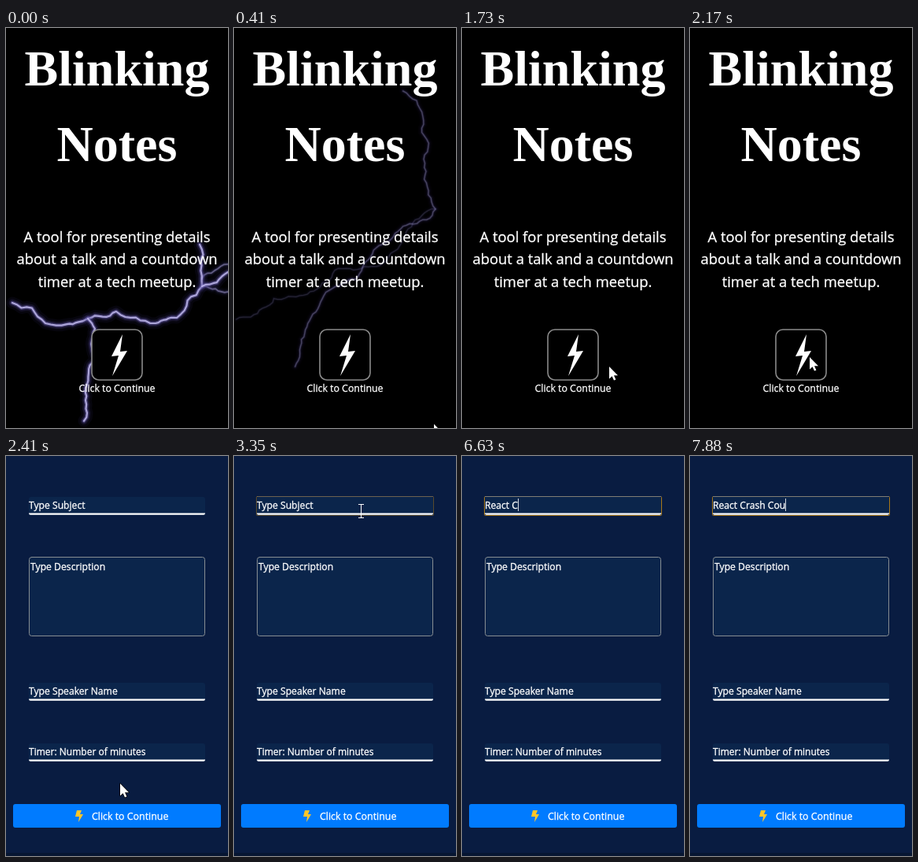
An HTML page with a canvas for the animation above (8 s loop, 282 by 508 pixels).

```html
<!DOCTYPE html>
<html lang="en">
<head>
<meta charset="utf-8">
<title>Blinking Notes</title>
<style>
  html, body { margin: 0; width: 282px; height: 508px; overflow: hidden; background: #000; }
  canvas { display: block; }
</style>
</head>
<body>
<canvas id="stage" width="282" height="508"></canvas>
<script>
const ctx = document.getElementById('stage').getContext('2d');
const LOOP = 8000, FORM_AT = 2340, FOCUS_AT = 3350, TYPE_AT = 5460;
const SANS = '"Open Sans", "Noto Sans", sans-serif';
const SERIF = '"Liberation Serif", "Noto Serif", serif';

let seed = 7;
const random = () => (seed = (seed * 16807) % 2147483647) / 2147483647;
const mix = (a, b, k) => a + (b - a) * k;

// Lightning: a few knots, made jagged by midpoint displacement.
function jag(a, b, out) {
  const dx = b[0] - a[0], dy = b[1] - a[1];
  if (Math.hypot(dx, dy) < 7) return out.push(b);
  const k = (random() - 0.5) * 0.3;
  const mid = [a[0] + dx / 2 - dy * k, a[1] + dy / 2 + dx * k];
  jag(a, mid, out);
  jag(mid, b, out);
}

function branch(text) {
  const knots = text.split(' ').map(p => p.split(',').map(Number));
  const points = [knots[0]];
  for (let i = 1; i < knots.length; i++) jag(knots[i - 1], knots[i], points);
  return new Path2D('M' + points.join('L'));
}

const flash = (start, hold, end, main, faint) =>
  ({ start, hold, end, main: main.map(branch), faint: faint.map(branch) });

function randomFlash(start, hold, end) {
  const spot = y => `${random() * 282},${y}`;
  const fork = spot(230);
  return flash(start, hold, end, [`${spot(80)} ${fork} ${spot(430)}`], [`${fork} ${spot(370)}`]);
}

const flashes = [
  flash(0, 80, 210,
    ['8,349 50,375 104,369 140,360 190,375 217,368 249,328 246,275',
      '249,328 282,310', '104,369 113,382 101,457 99,499'],
    ['249,318 282,300', '250,328 282,335']),
  randomFlash(210, 290, 470),
  randomFlash(610, 920, 920),
  flash(920, 1000, 1300,
    ['60,219 70,241 101,238 106,225 145,204 173,229', '272,349 282,373'],
    ['173,229 178,250 212,270 243,350 232,395', '173,229 188,235 215,207 192,160 166,112',
      '80,204 106,225', '132,209 184,236']),
  randomFlash(1300, 1420, 1660)
];

function strokeBolt(path, strength) {
  const layers = [[15, 0.1, '#3f3880'], [9, 0.2, '#4b4390'], [5, 0.45, '#6d63b4'], [2.2, 0.85, '#c0b9ee']];
  for (const [width, alpha, color] of layers) {
    ctx.lineWidth = width * mix(0.5, 1, strength);
    ctx.globalAlpha = alpha * strength;
    ctx.strokeStyle = color;
    ctx.stroke(path);
  }
  ctx.globalAlpha = 1;
}

function drawLightning(t) {
  ctx.lineJoin = ctx.lineCap = 'round';
  for (const f of flashes) {
    if (t < f.start || t >= f.end) continue;
    const power = t < f.hold ? 1 : (f.end - t) / (f.end - f.hold);
    f.faint.forEach(p => strokeBolt(p, power * 0.5));
    f.main.forEach(p => strokeBolt(p, power));
  }
}

function write(text, x, y, size, align = 'left') {
  ctx.font = `${size}px ${SANS}`;
  ctx.textAlign = align;
  ctx.fillStyle = ctx.strokeStyle = '#fff';
  ctx.lineWidth = 0.3;
  ctx.fillText(text, x, y);
  ctx.strokeText(text, x, y);
}

function writeTitle(text, y) {
  ctx.font = `bold 64px ${SERIF}`;
  ctx.textAlign = 'center';
  ctx.fillStyle = '#fff';
  ctx.fillText(text, 141, y);
}

function rect(x, y, w, h, fill) {
  ctx.fillStyle = fill;
  ctx.fillRect(x, y, w, h);
}

function box(x, y, w, h, radius, fill, border, lineWidth = 1) {
  ctx.beginPath();
  ctx.roundRect(x, y, w, h, radius);
  if (fill) { ctx.fillStyle = fill; ctx.fill(); }
  if (border) { ctx.lineWidth = lineWidth; ctx.strokeStyle = border; ctx.stroke(); }
}

function shape(path, x, y, fill, outline) {
  const p = new Path2D(path);
  ctx.save();
  ctx.translate(x, y);
  if (outline) { ctx.lineWidth = 1.5; ctx.strokeStyle = outline; ctx.stroke(p); }
  ctx.fillStyle = fill;
  ctx.fill(p);
  ctx.restore();
}

function drawIntro(t) {
  rect(0, 0, 282, 508, '#000');
  drawLightning(t);
  writeTitle('Blinking', 73);
  writeTitle('Notes', 169);
  ['A tool for presenting details', 'about a talk and a countdown', 'timer at a tech meetup.']
    .forEach((line, i) => write(line, 141, Math.floor(272 + i * 28.5), 18.4, 'center'));
  box(109, 383, 64, 64, 9, '#000', '#8a8a8a', 1.6);
  shape('M15 0L1 28L10 27L2 53L21 21L12 22Z', 133, 389, '#fff');
  write('Click to Continue', 141, 462, 12.35, 'center');
}

// Each word starts after a pause and is typed at an even pace.
const words = [
  { text: 'React ', start: 5570, pace: 140 },
  { text: 'Crash ', start: 6630, pace: 150 },
  { text: 'Cou', start: 7700, pace: 90 }
];
const typedAt = t => words.map(({ text, start, pace }) =>
  text.slice(0, Math.max(0, Math.floor((t - start) / pace) + 1))).join('');

function lineField(y, text, size = 12.15) {
  box(29, y, 224, 23, 3, '#0b254b');
  box(29, y + 20.5, 224, 2.2, [0, 0, 2, 2], '#fff');
  write(text, 29, y + 15, size);
}

function drawFocus(t, typed) {
  ctx.globalAlpha = t < 3480 ? 0.5 : 1;
  box(28.5, 51.5, 225, 24, 1, null, '#a87718');
  rect(29, 51, 224, 1, '#817d74');
  ctx.globalAlpha = 1;
  const blinkOn = t >= 3480 && Math.floor((t - 3480) / 496) % 2 === 0;
  const caretX = Math.round(29 + ctx.measureText(typed).width);
  if (t >= TYPE_AT || blinkOn) rect(caretX, 54, 1, 16, '#d5dae2');
}

function drawForm(t) {
  rect(0, 0, 282, 508, '#091c41');
  rect(0, 504, 282, 4, '#071632');
  const typed = typedAt(t);
  lineField(52, typed || 'Type Subject');
  if (t >= FOCUS_AT) drawFocus(t, typed);
  box(29.5, 128.5, 223, 100, 3, '#0b254b', '#878d92');
  write('Type Description', 31, 145, 12.2);
  lineField(288, 'Type Speaker Name');
  lineField(365, 'Timer: Number of minutes', 12);
  box(9, 442, 264, 30, 3, '#007bff');
  shape('M2 0L8 0L6 5L10 5L4 15L5 8L0 8Z', 88, 450, '#ffc629');
  write('Click to Continue', 109, 462, 12.4);
}

// Pointer glides: each one starts where the last one ended.
const glides = [
  { from: 300, to: 780, x: 232, y: 468 },
  { from: 920, to: 1660, x: 187, y: 430 },
  { from: 1730, to: 2330, x: 145, y: 416 },
  { from: 2590, to: 3170, x: 161, y: 70 },
  { from: 3990, to: 4220, x: 238, y: 63 }
];

function drawPointer(t) {
  if (t < glides[0].from || t >= glides.at(-1).to) return;
  let x = 258, y = 508;
  for (const g of glides) {
    const k = Math.max(0, Math.min(1, (t - g.from) / (g.to - g.from)));
    const ease = k * k * (3 - 2 * k);
    x = mix(x, g.x, ease);
    y = mix(y, g.y, ease);
  }
  x = Math.round(x);
  y = Math.round(y);
  const overSubject = t >= FORM_AT && y > 52 && y < 75;
  if (overSubject) shape('M-3-9h7v1h-3v16h3v1h-7v-1h3v-16h-3z', x, y, '#fff');
  else shape('M0 0V15.5L3.6 12.2L6 17.5L8.4 16.4L6 11.2H11Z', x, y, '#fff', '#000');
}

function draw() {
  const t = performance.now() % LOOP;
  if (t < FORM_AT) drawIntro(t);
  else drawForm(t);
  drawPointer(t);
  requestAnimationFrame(draw);
}
draw();
</script>
</body>
</html>
```
